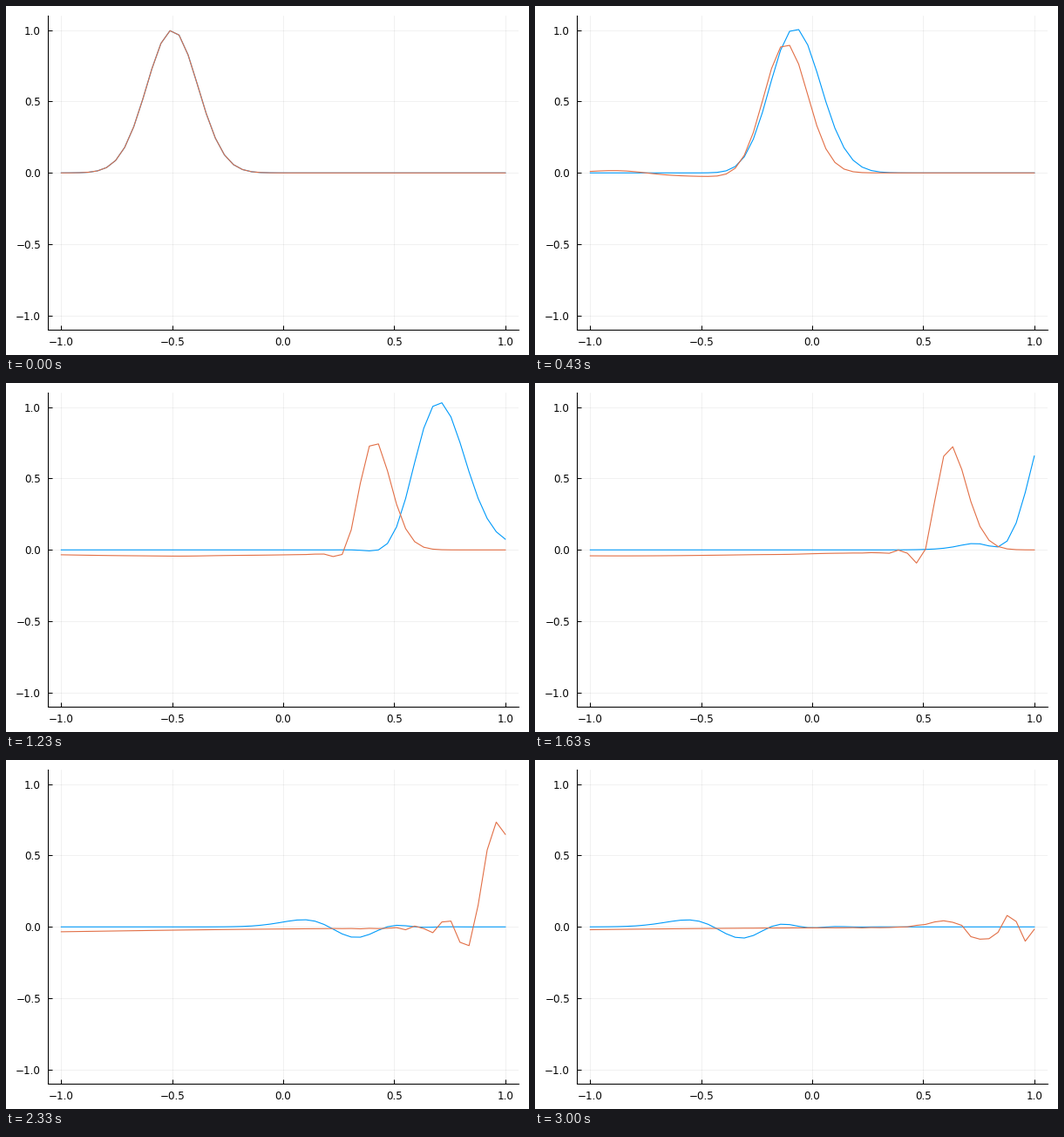
A matplotlib script for the animation above (3030 ms loop, 600x400 px).

```python
import numpy as np
import matplotlib.pyplot as plt
from matplotlib.animation import FuncAnimation

LOOP_MS, TICK_MS = 3030, 10
STATES, SUBSTEPS, DT = 91, 33, 0.001
N = 50

x = np.linspace(-1, 1, N)
h = x[1] - x[0]
mid = (x[:-1] + x[1:]) / 2

# One column per medium: constant speed, and speed falling from 1 to 0.5
speed = np.column_stack([np.ones(N), 0.75 - 0.25 * np.tanh(2.25 * (x - 0.04))])


def pulse(s):
    return np.exp(-37.5 * (s + 0.5) ** 2)


def euler(p, v):
    """One explicit step of acoustic waves on a staggered grid, one-way ends."""
    slope = np.diff(p, axis=0) / h
    dp = np.empty_like(p)
    dp[1:-1] = -speed[1:-1] ** 2 * np.diff(v, axis=0) / h
    dp[0] = speed[0] * slope[0]
    dp[-1] = -speed[-1] * slope[-1]
    return p + DT * dp, v - DT * slope


def solve():
    p = np.column_stack([pulse(x)] * 2)
    v = np.column_stack([pulse(mid)] * 2)
    states = [p]
    for _ in range(STATES - 1):
        for _ in range(SUBSTEPS):
            p, v = euler(p, v)
        states.append(p)
    return states


waves = solve()

plt.rcParams["font.family"] = "DejaVu Sans"
fig = plt.figure(figsize=(6, 4), dpi=100, facecolor="white")
ax = fig.add_axes([48.1 / 600, 28.7 / 400, 540 / 600, 360 / 400])
ax.set(xlim=(-1.06, 1.06), ylim=(-1.1, 1.1))
ticks = [-1, -0.5, 0, 0.5, 1]
ax.set_xticks(ticks)
ax.set_yticks(ticks)
ax.tick_params(direction="in", length=3.6, width=0.75, labelsize=8.6)
ax.tick_params(axis="x", pad=5.3)
ax.tick_params(axis="y", pad=5.8)
ax.grid(color="black", alpha=0.1, linewidth=0.4)
ax.set_axisbelow(True)
for side in ("top", "right"):
    ax.spines[side].set_visible(False)
for side in ("left", "bottom"):
    ax.spines[side].set_linewidth(0.75)

lines = [ax.plot(x, waves[0][:, k], color=color, linewidth=0.8)[0]
         for k, color in enumerate(("#009afa", "#e26f46"))]


def draw(i):
    # 30 states per second, each starting on the nearest 10 ms tick
    state = waves[(3 * i + 1) // 10]
    for k, line in enumerate(lines):
        line.set_ydata(state[:, k])
    return lines


anim = FuncAnimation(fig, draw, frames=LOOP_MS // TICK_MS, interval=TICK_MS,
                     repeat=True, repeat_delay=0)
plt.show()
```
